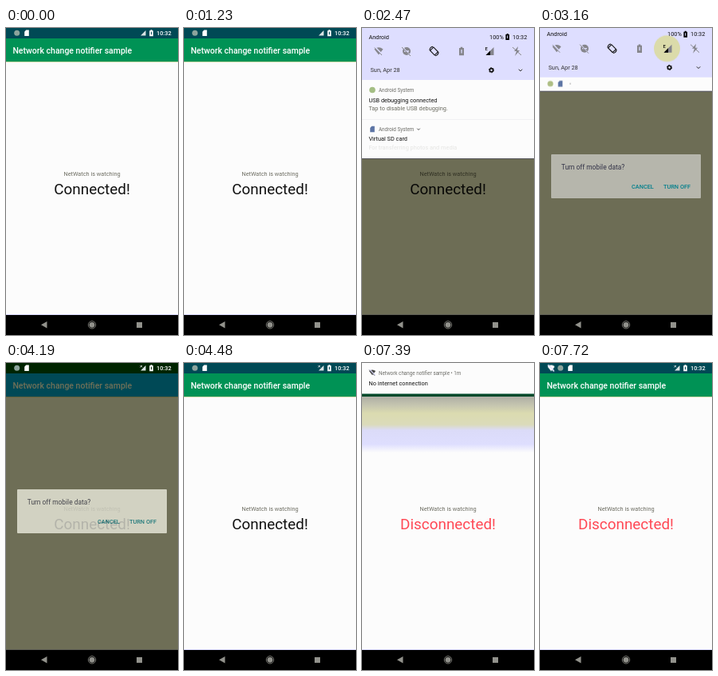
Animation, 216 px wide and 384 px high, one loop 8000 ms. Source, as an HTML page:

```html
<!DOCTYPE html>
<html lang="en">
<head>
<meta charset="utf-8">
<title>Network change notifier sample</title>
<style>
html, body { margin: 0; width: 100%; height: 100%; overflow: hidden; background: #fcfcfc; }
#stage { position: absolute; left: 0; top: 0; width: 216px; height: 384px; overflow: hidden; isolation: isolate; }
#stage > * { position: absolute; left: 0; top: 0; }
svg { display: block; }
text { font: 7.35px Roboto, sans-serif; fill: #111; }
.small { font-size: 6.3px; fill: #6d6d68; }
.bold { font-weight: 500; }
.white { fill: #fff; }
.grey { fill: #6d6d62; }
.title { font-size: 10.5px; }
.big { font-size: 18.9px; }
.action { font-weight: 500; fill: #007f8c; }
.anim, #shade, #dim { animation: 8s linear infinite; }

#dim { width: 216px; height: 359px; background: #6e6e56; mix-blend-mode: multiply; animation-name: dim; }
@keyframes dim {
  0%, 27.5% { opacity: 0; }
  30%, 52.375% { opacity: 1; }
  55.5%, 100% { opacity: 0; }
}
.status { fill: #004955; animation-name: status; }
@keyframes status {
  0%, 27.5% { fill: #004955; }
  30%, 52.375% { fill: #002400; }
  55.5%, 100% { fill: #004955; }
}
.toolbar { fill: #009255; animation-name: toolbar; }
@keyframes toolbar {
  0%, 38% { fill: #009255; }
  38.01%, 52.375% { fill: #00a8fc; }
  55.5%, 100% { fill: #009255; }
}
.connected { animation-name: connected; }
@keyframes connected {
  0%, 56.49% { opacity: 1; }
  56.5%, 100% { opacity: 0; }
}
.disconnected { fill: #ff4955; animation-name: disconnected; }
@keyframes disconnected {
  0%, 56.49% { opacity: 0; }
  56.5%, 100% { opacity: 1; }
}
.no-data { animation-name: no-data; }
@keyframes no-data {
  0%, 52.37% { opacity: 0; }
  52.375%, 100% { opacity: 1; }
}
.tray { animation-name: tray; }
@keyframes tray {
  0%, 61% { transform: none; }
  61.01%, 100% { transform: translateX(12px); }
}
.tray-wifi { animation-name: tray-wifi; }
@keyframes tray-wifi {
  0%, 61% { opacity: 0; }
  61.01%, 100% { opacity: 1; }
}

.dialog { animation-name: dialog; }
@keyframes dialog {
  0%, 36.5% { opacity: 0; }
  38.5%, 52.37% { opacity: 1; }
  52.375% { opacity: .7; }
  54.5%, 100% { opacity: 0; }
}
.card { animation-name: card; }
@keyframes card {
  0%, 39.5% { fill: #b6b6ac; }
  42.5%, 52.37% { fill: #fcfcfc; }
  52.375%, 100% { fill: #fffff2; }
}

#shade { width: 216px; overflow: hidden; background: #fcfcfc; border-bottom: 1px solid #d8d8c8; animation-name: shade; }
@keyframes shade {
  0%, 24.6% { height: 82px; transform: translateY(-87px); }
  27.25% { height: 82px; transform: translateY(-34px); border-color: #d8d8c8; }
  28.75% { height: 82px; transform: none; }
  30.6%, 35.5% { height: 163px; transform: none; border-color: #55555a; }
  38.7% { height: 82px; transform: none; }
  39.5% { height: 82px; transform: translateY(-3px); }
  42.8%, 100% { height: 82px; transform: translateY(-87px); }
}
.notes { animation-name: notes; }
@keyframes notes {
  0%, 28.75% { opacity: 0; }
  30.6%, 36% { opacity: 1; }
  38.8%, 100% { opacity: 0; }
}
.icon-row { animation-name: icon-row; }
@keyframes icon-row {
  0%, 28.75% { opacity: 1; }
  30.2%, 37.5% { opacity: 0; }
  39%, 100% { opacity: 1; }
}
.last-line { animation-name: last-line; }
@keyframes last-line {
  0%, 30.875% { opacity: .15; }
  32.5%, 100% { opacity: 1; }
}
.ripple { fill: #dbdbaa; transform-origin: 159.5px 29px; animation-name: ripple; }
@keyframes ripple {
  0%, 34.875% { transform: scale(0); opacity: 1; }
  37.5%, 39.5% { transform: none; opacity: 1; }
  42%, 100% { transform: none; opacity: 0; }
}

.heads-up { animation-name: heads-up; }
@keyframes heads-up {
  0%, 59% { transform: translateY(-42px); animation-timing-function: ease-out; }
  62.125%, 92.375% { transform: none; animation-timing-function: ease-in; }
  95.5%, 100% { transform: translateY(-42px); }
}
.scrim { animation-name: scrim; }
@keyframes scrim {
  0%, 59% { opacity: 0; }
  62.125%, 92.375% { opacity: 1; }
  96.4%, 100% { opacity: 0; }
}
</style>
</head>
<body>
<div id="stage">

<svg width="216" height="384">
  <defs>
    <symbol id="wifi-off" viewBox="-6 -6 12 12" overflow="visible">
      <path d="M-5.5-2.5Q0-7 5.5-2.5L0 4.5Z"/>
      <path d="M-4.5-5L4.5 4.5" stroke="#dedeff" stroke-width="2"/>
      <path d="M-5.2-4.5L4 5" stroke="currentColor"/>
    </symbol>
    <path id="sd" d="M-2.8-1.5L-.8-3.7H2.8V3.7H-2.8Z"/>
    <path id="battery" fill-rule="evenodd" d="M-1-4H1V-3H2.3V4H-2.3V-3H-1ZM-.5-1.5H.5V2H-.5Z"/>
    <path id="signal" d="M4-4V4H-4Z"/>
    <path id="chevron" d="M-2.2-1L0 1.2L2.2-1" fill="none" stroke="#222"/>
    <linearGradient id="shadow" x2="0" y2="1">
      <stop offset="0" stop-color="#aeaea4"/>
      <stop offset=".16" stop-color="#c6c6b0"/>
      <stop offset=".3" stop-color="#dbdbb0"/>
      <stop offset=".5" stop-color="#dbdbba"/>
      <stop offset=".6" stop-color="#dbdbf8"/>
      <stop offset=".85" stop-color="#dedeff"/>
      <stop offset="1" stop-color="#fcfcfc"/>
    </linearGradient>
  </defs>

  <rect width="216" height="384" fill="#fcfcfc"/>
  <rect y="358" width="216" height="1" fill="#dbdbff"/>
  <rect y="42" width="216" height="1" fill="#dbdbaa"/>
  <rect class="anim toolbar" y="12" width="216" height="30"/>
  <text class="title bold white" x="8.4" y="31.5">Network change notifier sample</text>

  <text class="grey" x="108" y="184.5" text-anchor="middle">NetWatch is watching</text>
  <text class="anim big connected" x="108" y="208" text-anchor="middle">Connected!</text>
  <text class="anim big disconnected" x="108" y="208" text-anchor="middle">Disconnected!</text>
</svg>

<div id="dim"></div>

<svg width="216" height="384">
  <rect class="anim status" width="216" height="13"/>
  <g class="anim tray-wifi" fill="#fff" color="#fff"><use href="#wifi-off" x="9" y="1.5" width="10" height="10"/></g>
  <g class="anim tray">
    <circle cx="13.7" cy="6.2" r="3.5" fill="#8ca49c"/>
    <use href="#sd" x="26" y="6.2" fill="#fff"/>
  </g>
  <use href="#signal" transform="translate(172.3 6.2) scale(.8)" fill="#dbe4e4"/>
  <path class="anim no-data" d="M168.5 3L171 5.5M171 3L168.5 5.5" stroke="#fff" stroke-width=".8"/>
  <use href="#battery" x="182.5" y="6.2" fill="#fff"/>
  <text class="bold white" x="189" y="9">10:32</text>

  <g class="anim dialog">
    <rect class="anim card" x="14" y="158" width="188" height="55" rx="1"/>
    <text x="26.8" y="176.5" style="font-size:8.4px;fill:#333348">Turn off mobile data?</text>
    <text class="action" x="115" y="201">CANCEL</text>
    <text class="action" x="155" y="201">TURN OFF</text>
  </g>
</svg>

<div id="shade">
  <svg width="216" height="164">
    <rect width="216" height="65" fill="#dedeff"/>
    <circle class="anim ripple" cx="159.5" cy="29" r="16.5"/>
    <text x="8.4" y="13.5">Android</text>
    <text x="160" y="13.5">100%</text>
    <use href="#battery" x="182.7" y="11"/>
    <text x="189" y="13.5">10:32</text>

    <g fill="#86868c" color="#86868c">
      <use href="#wifi-off" x="15" y="23" width="12" height="12"/>
      <circle cx="56" cy="29" r="5"/>
      <path d="M53 29H59M51 24L61 35" stroke="#dedeff" stroke-width="1.3"/>
      <path d="M50 24L61 35" stroke="#86868c"/>
      <use href="#battery" transform="translate(125 29) scale(1.3)"/>
      <path d="M196 23L191 29H194L192 35L198 28H195Z"/>
      <path d="M189 24L200 34" stroke="#86868c"/>
    </g>
    <g fill="none" stroke="#111" stroke-width="1.1">
      <rect x="87.5" y="25" width="6" height="8" transform="rotate(-45 90.5 29)"/>
      <path d="M85 28Q85 24 89 23.3M96 30Q96 34 92 34.7"/>
    </g>
    <use href="#signal" transform="translate(160.5 29) scale(1.25)" fill="#84848c"/>
    <path d="M161 28.5V34H155.5Z"/>
    <text class="bold" x="154.5" y="28" style="font-size:6px">E</text>

    <text x="10.5" y="55" style="fill:#333">Sun, Apr 28</text>
    <circle cx="162.5" cy="52.7" r="2.1" fill="none" stroke="#111" stroke-width="1.6"/>
    <circle cx="162.5" cy="52.7" r="3.1" fill="none" stroke="#111" stroke-dasharray="1.6 1.65"/>
    <use href="#chevron" x="199" y="52.7"/>

    <g class="anim icon-row">
      <circle cx="13" cy="73" r="3.6" fill="#aebe84"/>
      <use href="#sd" x="25.5" y="73" fill="#5c74a4"/>
      <circle cx="38" cy="73" r=".8" fill="#999"/>
    </g>
    <g class="anim notes">
      <circle cx="13" cy="77.5" r="3.8" fill="#a4be84"/>
      <text class="small" x="21" y="79.7">Android System</text>
      <text x="8.4" y="92.7">USB debugging connected</text>
      <text class="grey" x="8.4" y="103.3">Tap to disable USB debugging.</text>
      <rect y="114.5" width="216" height=".5" fill="#e6e6ea"/>
      <use href="#sd" x="13" y="126.5" fill="#5c74a4"/>
      <text class="small" x="21" y="128.7">Android System</text>
      <use href="#chevron" transform="translate(71 126.5) scale(.8)"/>
      <text x="8.4" y="141.3">Virtual SD card</text>
      <text class="anim grey last-line" x="8.4" y="152">For transferring photos and media</text>
    </g>
  </svg>
</div>

<svg width="216" height="384">
  <g class="anim scrim">
    <rect width="216" height="42" fill="#000" fill-opacity=".5"/>
    <rect y="42" width="216" height="70" fill="url(#shadow)"/>
  </g>
  <g class="anim heads-up">
    <rect width="216" height="38.5" fill="#fcfcfc"/>
    <g fill="#444" color="#444"><use href="#wifi-off" x="8.5" y="7.5" width="9" height="9"/></g>
    <text class="small" x="21" y="14.7">Network change notifier sample • 1m</text>
    <text x="8.4" y="27.7">No internet connection</text>
  </g>

  <rect y="359" width="216" height="25"/>
  <g fill="#92928c">
    <path d="M44 371.3L51.5 367V375.6Z"/>
    <circle cx="108" cy="371.3" r="3.4"/>
    <circle cx="108" cy="371.3" r="4.7" fill="none" stroke="#92928c" stroke-width=".8"/>
    <rect x="164" y="368" width="7" height="7"/>
  </g>
</svg>

</div>
</body>
</html>
```
